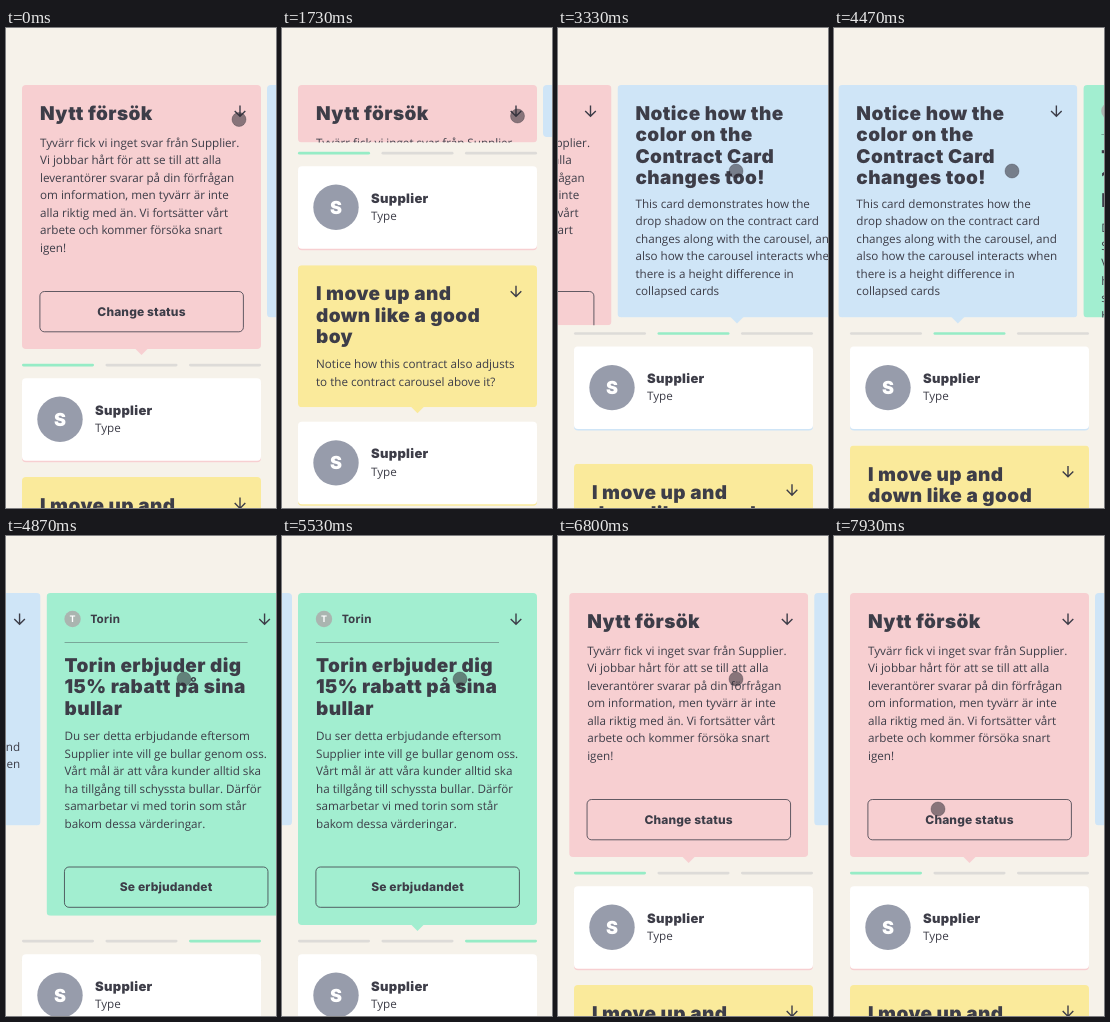
An HTML page for the animation above (8000 ms loop, 270 px wide and 480 px high).

```html
<!DOCTYPE html>
<html lang="sv">
<head>
<meta charset="utf-8">
<title>Contract carousel</title>
<style>
  html, body { margin: 0; width: 100%; height: 100%; overflow: hidden; background: #f6f2ea; }
  svg { display: block; }
  #stage { width: 100vw; height: 100vh; }
  text { fill: #3d3d48; text-rendering: geometricPrecision; }
  .title { font: 900 19px Inter, sans-serif; letter-spacing: .4px; }
  .body { font: 400 11.66px "Open Sans", sans-serif; }
  .who { font: 700 11.66px "Open Sans", sans-serif; }
  .name { font: 900 13px Inter, sans-serif; letter-spacing: .3px; }
  .btn { font: 800 12px Inter, sans-serif; letter-spacing: .15px; text-anchor: middle; }
  .initial { font: 900 18px Inter, sans-serif; text-anchor: middle; fill: #fff; }
  .small { font: 700 9px Inter, sans-serif; text-anchor: middle; fill: #fff; }
  .line { fill: none; stroke: #3d3d48; }
</style>
</head>
<body>
<svg id="stage" viewBox="0 0 270 480"></svg>
<script>
const LOOP = 8000, TOP = 57, LEFT = 16, WIDTH = 239, PITCH = 245, FOLDED = 52;
const COLORS = ['#f7cfd1', '#cfe5f7', '#a2eed0'];
const YELLOW = '#faea9b';
const OPEN = [264, 232.4, 332];
const stage = document.getElementById('stage');

function add(parent, tag, attrs, text) {
  const el = document.createElementNS('http://www.w3.org/2000/svg', tag);
  set(el, attrs);
  if (text) el.textContent = text;
  parent.append(el);
  return el;
}
function set(el, attrs) {
  for (const k in attrs) el.setAttribute(k, attrs[k]);
}
function lines(parent, cls, y, step, rows) {
  rows.forEach((row, i) => add(parent, 'text', { class: cls, x: 18, y: y + i * step }, row));
}
const title = (p, y, rows) => lines(p, 'title', y, 21.4, rows);
const body = (p, y, rows) => lines(p, 'body', y, 17.45, rows);

function arrow(p) {
  add(p, 'path', { class: 'line', 'stroke-width': 1.4, d: 'M218 20.5v10.7M212.7 26l5.3 5.3 5.3-5.3' });
}
function button(p, y, label) {
  add(p, 'rect', { class: 'line', 'stroke-width': .8, x: 17.9, y, width: 203.5, height: 40.3, rx: 4.5 });
  add(p, 'text', { class: 'btn', x: 119.5, y: y + 24 }, label);
}

// A coloured card: a clipped box with its contents and a small pointer below.
function card(fill) {
  const g = add(stage, 'g', {});
  const tip = add(g, 'path', { d: 'M113 -.5h13l-6.5 6.5z', fill });
  const box = add(g, 'svg', { width: WIDTH, overflow: 'hidden' });
  const back = add(box, 'rect', { width: WIDTH, rx: 4, fill });
  return { g, tip, box, back };
}
function place(c, x, y, h, tip) {
  set(c.g, { transform: `translate(${x} ${y})` });
  set(c.box, { height: h });
  set(c.back, { height: h });
  set(c.tip, { transform: `translate(0 ${h})`, visibility: tip ? 'visible' : 'hidden' });
}
function supplier(fill) {
  const g = add(stage, 'g', {});
  const shade = add(g, 'rect', { y: 2, width: WIDTH, height: 82, rx: 4, fill });
  add(g, 'rect', { width: WIDTH, height: 82.5, rx: 4, fill: '#fff' });
  add(g, 'circle', { cx: 38, cy: 41, r: 22.7, fill: '#979cab' });
  add(g, 'text', { class: 'initial', x: 38, y: 47.5 }, 'S');
  add(g, 'text', { class: 'name', x: 73, y: 36.5 }, 'Supplier');
  add(g, 'text', { class: 'body', x: 73, y: 53.7 }, 'Type');
  return { g, shade };
}

const slides = COLORS.map(card);
const [first, second, third] = slides.map(s => s.box);

title(first, 35, ['Nytt försök']);
arrow(first);
body(first, 62, ['Tyvärr fick vi inget svar från Supplier.', 'Vi jobbar hårt för att se till att alla',
  'leverantörer svarar på din förfrågan', 'om information, men tyvärr är inte',
  'alla riktig med än. Vi fortsätter vårt', 'arbete och kommer försöka snart', 'igen!']);
button(first, 206.5, 'Change status');

title(second, 35, ['Notice how the', 'color on the', 'Contract Card', 'changes too!']);
arrow(second);
body(second, 123, ['This card demonstrates how the', 'drop shadow on the contract card',
  'changes along with the carousel, and', 'also how the carousel interacts when',
  'there is a height difference in', 'collapsed cards']);

add(third, 'circle', { cx: 26, cy: 26, r: 8.2, fill: '#aab5b0' });
add(third, 'text', { class: 'small', x: 26, y: 29.4 }, 'T');
add(third, 'text', { class: 'who', x: 44, y: 30.3 }, 'Torin');
arrow(third);
add(third, 'path', { class: 'line', d: 'M18 49.5h183', opacity: .4 });
title(third, 79, ['Torin erbjuder dig', '15% rabatt på sina', 'bullar']);
body(third, 147.3, ['Du ser detta erbjudande eftersom', 'Supplier inte vill ge bullar genom oss.',
  'Vårt mål är att våra kunder alltid ska', 'ha tillgång till schyssta bullar. Därför',
  'samarbetar vi med torin som står', 'bakom dessa värderingar.']);
button(third, 274, 'Se erbjudandet');

const bars = [16, 99.5, 183].map(x => add(stage, 'rect', { x, width: 72, height: 2.6, rx: 1.3 }));
const topSupplier = supplier(COLORS[0]);
const lowSupplier = supplier(YELLOW);
const lower = card(YELLOW);
title(lower.box, 35, ['I move up and', 'down like a good', 'boy']);
arrow(lower.box);
body(lower.box, 103.3, ['Notice how this contract also adjusts', 'to the contract carousel above it?']);

const cursor = add(stage, 'circle', { r: 7, fill: '#2d2a33', 'fill-opacity': .55,
  stroke: '#2d2a33', 'stroke-opacity': .3 });

// CSS-style cubic-bezier easing
function bezier(x1, y1, x2, y2) {
  const at = (a, b, s) => 3 * (1 - s) ** 2 * s * a + 3 * (1 - s) * s * s * b + s ** 3;
  return u => {
    let lo = 0, hi = 1;
    for (let i = 0; i < 24; i++) {
      const mid = (lo + hi) / 2;
      if (at(x1, x2, mid) < u) lo = mid; else hi = mid;
    }
    return at(y1, y2, lo);
  };
}
const ease = bezier(.25, .1, .25, 1);
const inOut = bezier(.42, 0, .58, 1);
const swipe = bezier(.6, 0, .15, 1);
const flick = bezier(.2, 0, .03, 1);

// Each step: start, end, value reached, easing
const [tall, low, high] = OPEN;
const tracks = {
  scroll: [0, [2780, 3780, 245, swipe], [4302, 5202, 490, swipe], [6050, 6943, 0, flick]],
  index: [0, [3186, 3186, 1], [4668, 4668, 2], [6167, 6167, 1], [6370, 6370, 0]],
  height: [tall, [3186, 3506, low, ease], [4668, 4988, high, ease], [6150, 6350, low, ease], [6360, 6680, tall, ease]],
  below: [tall, [3186, 3506, low, inOut], [4668, 4988, high, inOut], [6167, 6380, low, inOut], [6390, 6700, tall, inOut]],
  lead: [1, [440, 930, 0, inOut], [1675, 2160, 1, inOut]],
  follow: [1, [440, 930, 0, inOut], [1725, 2210, 1, inOut]],
  cx: [233, [40, 270, 235.5, inOut], [1980, 2470, 178, inOut], [7290, 7930, 104, inOut]],
  cy: [91.5, [40, 270, 88, inOut], [1980, 2470, 143, inOut], [7290, 7930, 273, inOut]]
};
const mix = (a, b, k) => a + (b - a) * k;

function value([start, ...steps], t) {
  let v = start;
  for (const [from, to, goal, curve] of steps) {
    if (t < from) break;
    v = t >= to ? goal : mix(v, goal, curve((t - from) / (to - from)));
  }
  return v;
}

function draw(t) {
  const s = {};
  for (const k in tracks) s[k] = value(tracks[k], t);

  slides.forEach((c, i) => {
    const fold = i ? s.follow : s.lead;
    const full = Math.min(OPEN[i], s.height);
    const still = fold === 0 || fold === 1 && full === OPEN[i];
    place(c, LEFT + i * PITCH - s.scroll, TOP, mix(FOLDED, full, fold), still);
  });

  const base = TOP + mix(FOLDED, OPEN[s.index], s.follow);
  bars.forEach((b, i) => set(b, { y: base + 14.8, fill: i === s.index ? '#96ecc6' : '#dddbd8' }));
  set(topSupplier.g, { transform: `translate(${LEFT} ${base + 29.2})` });
  set(topSupplier.shade, { fill: COLORS[s.index] });

  const y = TOP + mix(FOLDED, s.below, s.follow) + 128.1;
  place(lower, LEFT, y, 142, true);
  set(lowSupplier.g, { transform: `translate(${LEFT} ${y + 156.7})` });
  set(cursor, { cx: s.cx, cy: s.cy });
}

const begin = performance.now();
function tick() {
  draw((performance.now() - begin) % LOOP);
  requestAnimationFrame(tick);
}
tick();
</script>
</body>
</html>
```
